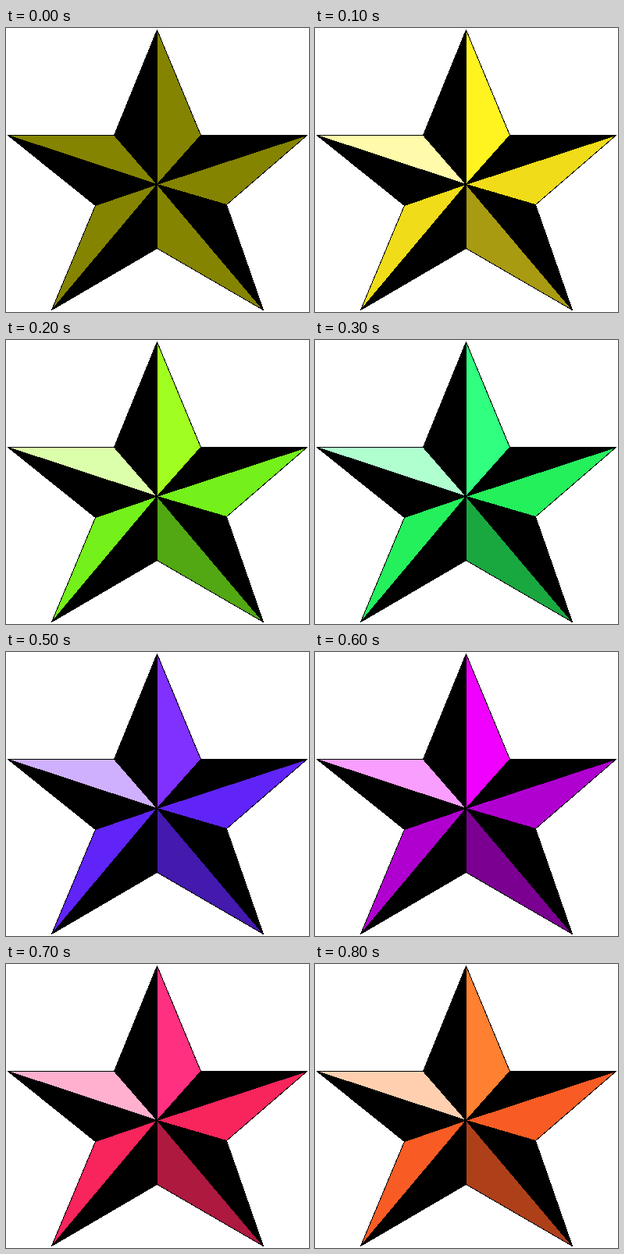
Write an HTML page that moves like this. It is 388 by 364 pixels and loops after 0.9 s.

```html
<!DOCTYPE html>
<html lang="en">
<head>
<meta charset="utf-8">
<title>Nautical star</title>
<style>
  html, body { margin: 0; width: 100%; height: 100%; overflow: hidden; background: #fff; }
  svg { display: block; width: 100vw; height: 100vh; }
  polygon { stroke: #000; stroke-linejoin: bevel; }
</style>
</head>
<body>
<svg id="stage" viewBox="0 0 388 364" shape-rendering="crispEdges"></svg>
<script>
const STEP = 100;
const CENTER = '193.5,200.5';

// Clockwise from the top: tip, notch, tip, notch, ...
const RIM = ('193.5,2.5 249.5,137.5 385.5,137.5 282.5,226.5 329.5,361.5 ' +
  '193.5,282.5 58.5,361.5 114.5,227.5 2.5,137.5 138.5,137.5').split(' ');

// Mixes a #rrggbb colour towards a grey level
function mix(color, level, amount) {
  const channels = color.match(/\w\w/g).map(hex => {
    const value = parseInt(hex, 16);
    return Math.round(value + (level - value) * amount);
  });
  return `rgb(${channels})`;
}

// Facet colours clockwise: the light falls from the upper left
const lit = (bright, mid) =>
  [bright, mid, mix(mid, 0, 0.3), mid, mix(bright, 255, 0.62)];

const PALETTES = [
  Array(5).fill('#848400'),
  lit('#fff420', '#f0dc18'),
  lit('#a0ff20', '#74f01a'),
  lit('#30ff80', '#24f05c'),
  lit('#10c0ff', '#0c90e0'),
  lit('#8030ff', '#6024f8'),
  lit('#f000ff', '#b000d0'),
  lit('#ff3080', '#f8245c'),
  lit('#ff8030', '#f85c24')
];

const stage = document.getElementById('stage');

function polygon(points) {
  const el = document.createElementNS('http://www.w3.org/2000/svg', 'polygon');
  el.setAttribute('points', points.join(' '));
  stage.append(el);
  return el;
}

polygon(RIM);
const facets = PALETTES[0].map((_, arm) =>
  polygon([CENTER, RIM[2 * arm], RIM[2 * arm + 1]]));

function draw(time) {
  const palette = PALETTES[Math.floor(time / STEP) % PALETTES.length];
  facets.forEach((el, arm) => el.setAttribute('fill', palette[arm]));
}

const start = performance.now();
function tick() {
  draw(performance.now() - start);
  requestAnimationFrame(tick);
}
draw(0);
requestAnimationFrame(tick);
</script>
</body>
</html>
```
